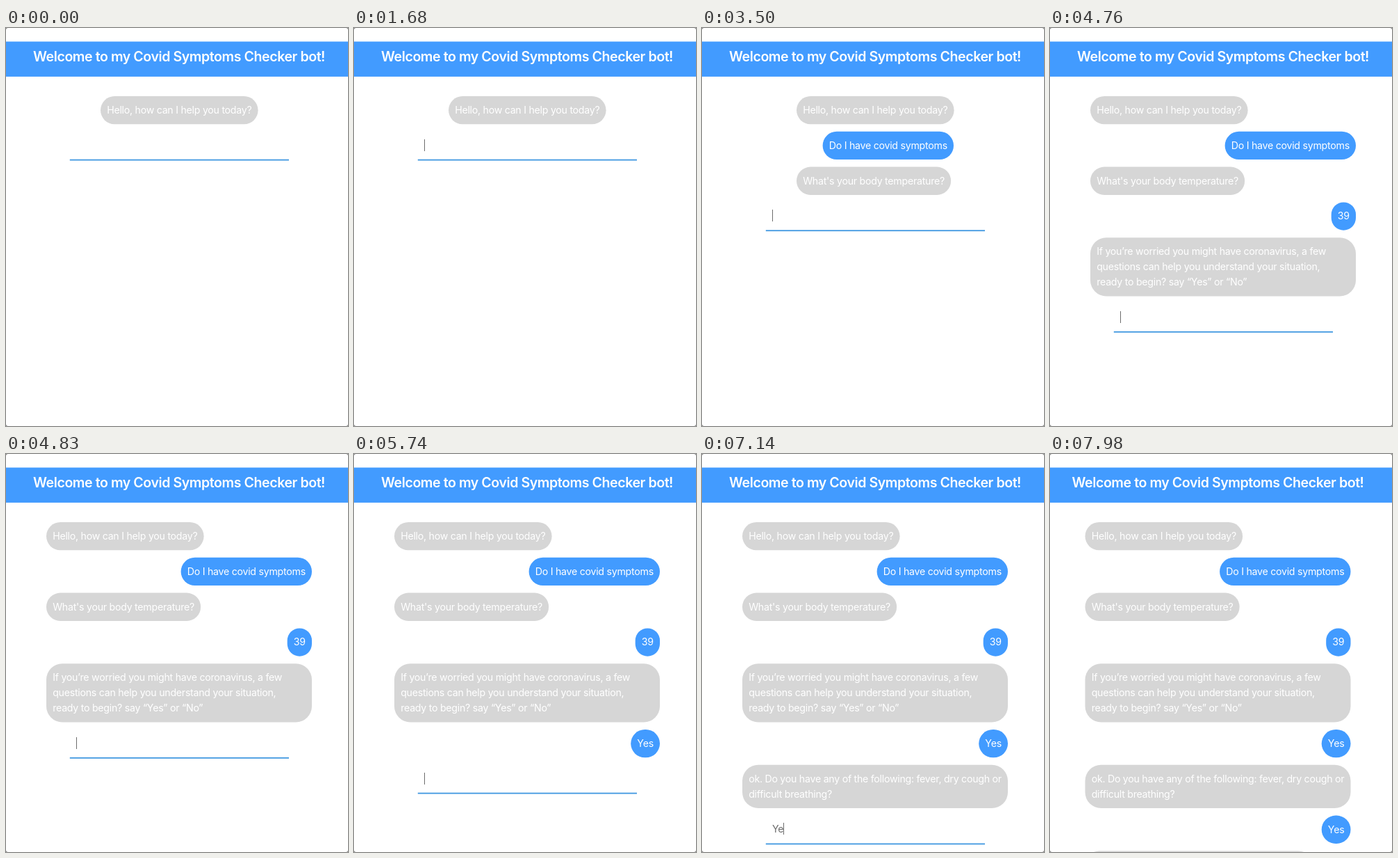
These frames come from a looping animation (492 px wide and 572 px high, 8 s). An HTML page with a canvas:

```html
<!DOCTYPE html>
<html lang="en">
<head>
<meta charset="utf-8">
<title>Symptoms checker chat</title>
<style>
  html, body { margin: 0; width: 100%; height: 100%; overflow: hidden; background: #fff; }
  canvas { display: block; width: 492px; height: 572px; }
</style>
</head>
<body>
<canvas id="stage" width="492" height="572"></canvas>
<script>
const W = 492, H = 572, LOOP = 8000;
const ctx = document.getElementById('stage').getContext('2d');

const BLUE = '#429bff', GREY = '#d6d6d6', LINE = '#4299e1', INK = '#6c6c6c';
const FONT = 'Inter, "Open Sans", sans-serif';
const PAD = 9.15, LINE_H = 22, GAP = 10.5, FIRST_TOP = 98;

// Times at which the column widens and at which the page starts to overflow
const WIDEN = 4760, OVERFLOW = 7560;

const messages = [
  { at: 0, lines: ['Hello, how can I help you today?'] },
  { at: 2450, user: true, lines: ['Do I have covid symptoms'] },
  { at: 2660, lines: ["What's your body temperature?"] },
  { at: 4480, user: true, lines: ['39'] },
  { at: 4760, lines: [
    'If you’re worried you might have coronavirus, a few',
    'questions can help you understand your situation,',
    'ready to begin? say “Yes” or “No”'] },
  { at: 5740, user: true, lines: ['Yes'] },
  { at: 6020, lines: [
    'ok. Do you have any of the following: fever, dry cough or',
    'difficult breathing?'] },
  { at: 7560, user: true, lines: ['Yes'] },
  { at: 7840, lines: ['Have you been in contact with anyone infected?'] }
];

const typing = [
  [0, ''], [2100, 'Do I have covid symptoms'], [2450, ''],
  [4130, '3'], [4270, '39'], [4480, ''],
  [5250, 'Y'], [5390, 'Ye'], [5530, 'Yes'], [5740, ''],
  [7070, 'Y'], [7140, 'Ye'], [7280, 'Yes'], [7560, '']
];

const caretOn = [[1680, 3010], [3500, 3990], [4130, 5040], [5250, 6230], [6730, LOOP]];

function setFont(size, weight, tracking) {
  ctx.font = `${weight} ${size}px ${FONT}`;
  ctx.letterSpacing = tracking + 'px';
}

function drawHeader(shift) {
  ctx.fillStyle = BLUE;
  ctx.fillRect(0, 19.5, W, 50.4);
  setFont(19.6, 600, -0.45);
  ctx.fillStyle = '#fff';
  ctx.textAlign = 'center';
  ctx.fillText('Welcome to my Covid Symptoms Checker bot!', 249 - shift, 48);
  ctx.textAlign = 'left';
}

function drawBubble(msg, top, left, right) {
  const height = msg.lines.length * LINE_H + 2 * PAD;
  const width = msg.lines.length > 1
    ? right - left
    : ctx.measureText(msg.lines[0]).width + 2 * PAD;
  const x = msg.user ? right - width : left;
  ctx.fillStyle = msg.user ? BLUE : GREY;
  ctx.beginPath();
  ctx.roundRect(x, top, width, height, Math.min(23, height / 2, width / 2));
  ctx.fill();
  ctx.fillStyle = '#fff';
  const baseline = Math.round(top + 25);
  msg.lines.forEach((line, i) => ctx.fillText(line, x + PAD, baseline + i * LINE_H));
  return height;
}

function drawInput(t, bottom, shift) {
  ctx.fillStyle = LINE;
  ctx.fillRect(91.8 - shift, bottom + 50.4, 315.2, 1.83);
  const text = typing.findLast(([at]) => at <= t)[1];
  ctx.fillStyle = INK;
  ctx.fillText(text, 101 - shift, Math.round(bottom + 35));
  if (caretOn.some(([on, off]) => t >= on && t < off)) {
    const x = Math.round(101 - shift + ctx.measureText(text).width);
    ctx.fillRect(x, Math.round(bottom + 21.3), 1, 17);
  }
}

function drawCorners() {
  ctx.fillStyle = '#777';
  ctx.beginPath();
  ctx.rect(0, 0, W, H);
  ctx.roundRect(0, 0, W, H, 3);
  ctx.fill('evenodd');
}

function draw(t) {
  ctx.fillStyle = '#fff';
  ctx.fillRect(0, 0, W, H);
  const shift = t >= OVERFLOW ? 7.5 : 0;
  const left = (t >= WIDEN ? 58 : 136) - shift;
  const right = (t >= WIDEN ? 440 : 362) - shift;

  drawHeader(shift);
  setFont(14.2, 400, -0.27);
  let y = FIRST_TOP, bottom = 0;
  for (const msg of messages) {
    if (msg.at > t) break;
    bottom = y + drawBubble(msg, y, left, right);
    y = bottom + GAP;
  }
  drawInput(t, bottom, shift);
  drawCorners();
}

function frame() {
  draw(performance.now() % LOOP);
  requestAnimationFrame(frame);
}
frame();
</script>
</body>
</html>
```
